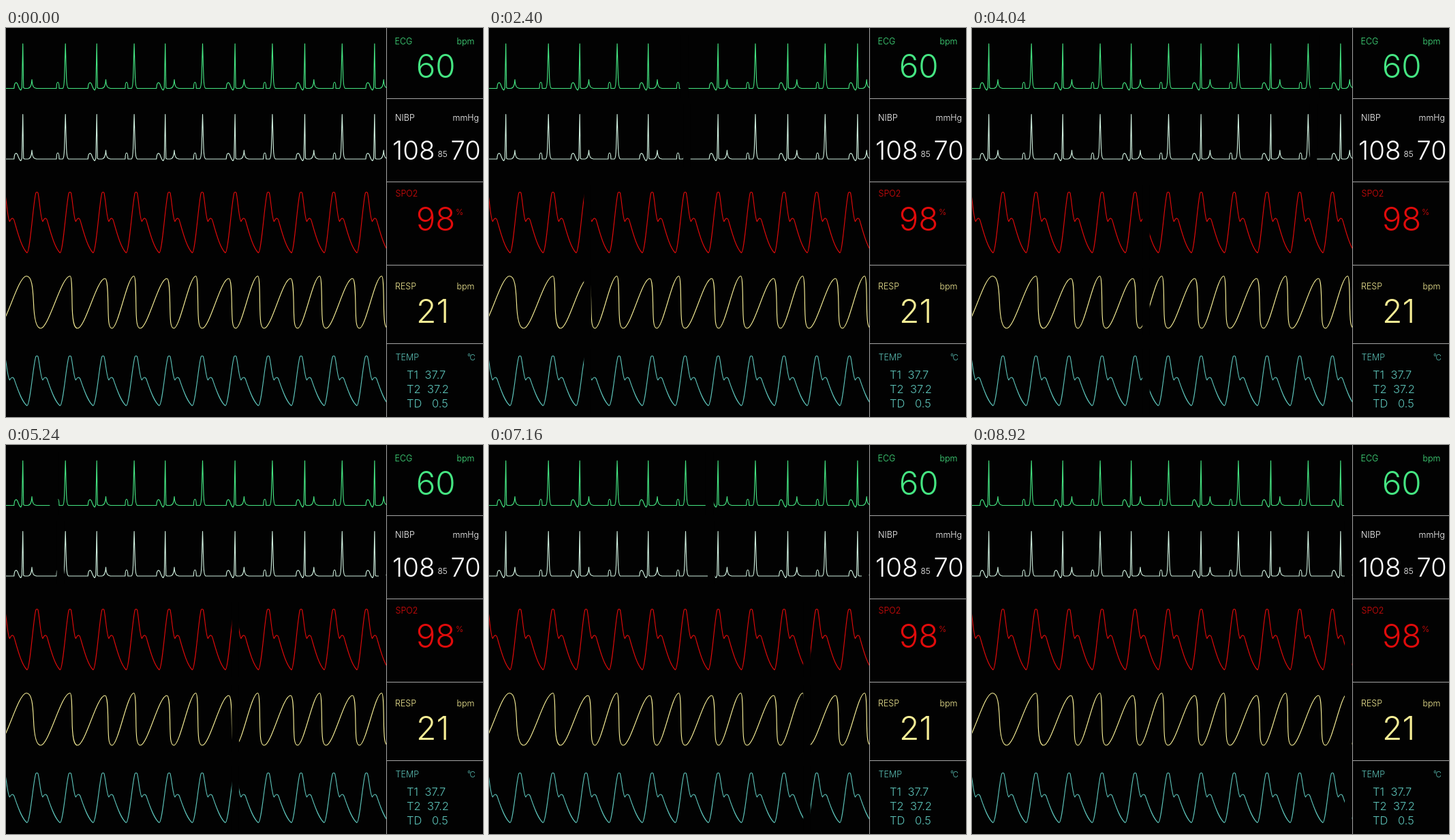
Recreate the animation shown at these times as an HTML page with a canvas. Size 700 by 570 pixels, loop 8960 ms.

```html
<!DOCTYPE html>
<html lang="en">
<head>
<meta charset="utf-8">
<title>Patient monitor</title>
<style>
html, body { margin: 0; width: 100%; height: 100%; overflow: hidden; background: #020202; }
canvas { display: block; }
</style>
</head>
<body>
<canvas id="stage" width="700" height="570"></canvas>
<script>
const ctx = document.getElementById('stage').getContext('2d');
const LOOP = 8960, HALF = LOOP / 2, STEP = 40;
const BACK = '#020202', RULE = '#a4a4a4', EDGE = 558;
const GREEN = '#45e582', WHITE = '#ffffff', PALE = '#cdeedd';
const RED = '#e00b0b', YELLOW = '#f6ee96', TEAL = '#5cc2b8';

// Two alternating kinds of beat on a flat baseline.
function heartTrace(base) {
  const path = new Path2D();
  const peak = base - 65.5;
  const narrow = x => {
    path.lineTo(x - 13, base);
    path.bezierCurveTo(x - 12.5, base - 9.5, x - 9, base - 11, x - 7, base - 4);
    path.bezierCurveTo(x - 5.5, base, x - 4.5, base + 2.5, x - 3, base + 2.5);
    path.lineTo(x - 1.5, base - 1);
    path.lineTo(x - 0.1, peak);
    path.lineTo(x + 0.9, base - 1);
    path.lineTo(x + 2.5, base);
    path.lineTo(x + 7, base);
    path.quadraticCurveTo(x + 12.5, base, x + 13.2, base - 13);
    path.quadraticCurveTo(x + 13.6, base - 3, x + 17, base - 1);
    path.lineTo(x + 20, base);
  };
  const wide = x => {
    path.lineTo(x - 13.2, base);
    path.bezierCurveTo(x - 13, base - 12, x - 9.3, base - 12, x - 9.2, base);
    path.lineTo(x - 4, base);
    path.quadraticCurveTo(x - 2, base - 1, x - 1.5, base - 16);
    path.lineTo(x, peak);
    path.lineTo(x + 1.5, base - 16);
    path.quadraticCurveTo(x + 2, base - 1, x + 4.5, base);
  };
  const pair = (x, apart) => {
    narrow(x);
    wide(x + apart);
  };
  path.moveTo(-2, base);
  pair(24.8, 62.4);
  pair(133.3, 54.8);
  for (let i = 0; i < 4; i++) pair(233.8 + 102.4 * i, 54.7);
  return path;
}

function pulseTrace(top, height) {
  const path = new Path2D();
  const k = height / 89;
  for (let i = -1; i < 12; i++) {
    const x = Math.min(45.4 + 48.5 * i, 49 + 48 * i);
    const curve = (a, b, c, d, e, f) =>
      path.bezierCurveTo(x + a, top + b * k, x + c, top + d * k, x + e, top + f * k);
    if (i < 0) path.moveTo(x - 14.5, top + height);
    curve(-10, 89, -5, 10, -1.5, 1);
    curve(-0.8, -0.3, 0.8, -0.3, 1.5, 1);
    curve(3.5, 8, 5.5, 40, 8.5, 43);
    curve(10, 40, 11.5, 38, 13, 38.5);
    curve(15, 39, 15.5, 43, 16.5, 46.5);
    curve(22, 66, 27, 82, 33.9, 89);
  }
  return path;
}

function breathTrace() {
  const path = new Path2D();
  const high = 363.5, low = 440;
  let from = -12.8;
  path.moveTo(from, low);
  const breath = (x, top, fall, trough) => {
    const span = x - from, lean = fall * 0.1;
    path.bezierCurveTo(from + span * 0.28, low, x - span * 0.3, top, x, top);
    path.bezierCurveTo(x + fall * 0.75, top, x + fall - lean, top + 16, x + fall, 402);
    path.bezierCurveTo(x + fall + lean, 430, x + trough - 5, low, x + trough, low);
    from = x + trough;
  };
  breath(30, high, 10.4, 20.8);
  breath(94, high, 3, 11);
  for (let i = 0; i < 5; i++) {
    breath(145.3 + 90.8 * i, 367, 4.4, 10.3);
    breath(187.7 + 90.9 * i, high, 3, 9.3);
  }
  return path;
}

const heartGap = t => Math.min(-36 + 0.132 * (t % HALF), 546);
const pressureGap = t => Math.min(-23.1 + 0.1284 * (t % HALF), 547);
const slowGap = t => Math.min(-23.1 + 0.06764 * t, 547);

const traces = [
  { path: heartTrace(88.5), color: GREEN, y: 10, h: 92, gap: heartGap, width: 12 },
  { path: heartTrace(192), color: PALE, y: 112, h: 92, gap: pressureGap, width: 10.6, keepsEnd: true },
  { path: pulseTrace(240.5, 89), color: RED, y: 230, h: 110, gap: slowGap, width: 10.6 },
  { path: breathTrace(), color: YELLOW, y: 352, h: 98, gap: slowGap, width: 10.6 },
  { path: pulseTrace(480.5, 73), color: TEAL, y: 470, h: 95, gap: slowGap, width: 10.6 }
];

// text, ink left, baseline, size, color
const labels = [
  ['ECG', 571.5, 23.5, 12.5, GREEN], ['bpm', 662.5, 23.5, 12.5, GREEN], ['60', 604.7, 73, 47.5, GREEN],
  ['NIBP', 572, 135.5, 12.5, WHITE], ['mmHg', 656.5, 135.5, 12.5, WHITE],
  ['108', 569, 193, 38.5, WHITE], ['85', 633.5, 189, 12, WHITE], ['70', 654.5, 193, 38, WHITE],
  ['SPO2', 571.5, 247, 12.5, RED], ['98', 604.7, 297, 47.5, RED], ['%', 661, 273.5, 12, RED],
  ['RESP', 572, 382.5, 12.5, YELLOW], ['bpm', 662.5, 382.5, 12.5, YELLOW], ['21', 605, 432, 48, YELLOW],
  ['TEMP', 571.5, 486.5, 12.5, TEAL], ['°', 677, 485.5, 11, TEAL], ['C', 680.5, 487, 11.5, TEAL],
  ['T1', 588, 513.5, 16.5, TEAL], ['37.7', 615.5, 513.5, 16.5, TEAL],
  ['T2', 588, 534.5, 16.5, TEAL], ['37.2', 619, 534.5, 16.5, TEAL],
  ['TD', 588, 555.5, 16.5, TEAL], ['0.5', 626, 555.5, 16.5, TEAL]
];

function drawTrace(trace, t) {
  ctx.strokeStyle = trace.color;
  ctx.stroke(trace.path);
  ctx.fillStyle = BACK;
  const cover = x => ctx.fillRect(x, trace.y, trace.width, trace.h);
  cover(trace.gap(t));
  if (trace.keepsEnd && t >= HALF) cover(547);
}

function drawLabel([text, x, y, size, color]) {
  ctx.font = `300 ${size}px Inter, sans-serif`;
  ctx.fillStyle = color;
  ctx.fillText(text, x + ctx.measureText(text).actualBoundingBoxLeft, y);
}

function draw(t) {
  ctx.fillStyle = BACK;
  ctx.fillRect(0, 0, 700, 570);
  ctx.save();
  ctx.beginPath();
  ctx.rect(0, 0, EDGE, 570);
  ctx.clip();
  ctx.lineWidth = 1.15;
  ctx.lineJoin = 'round';
  traces.forEach(trace => drawTrace(trace, t));
  ctx.restore();
  ctx.fillStyle = RULE;
  ctx.fillRect(EDGE, 0, 1, 570);
  for (const y of [103, 225, 347, 462]) ctx.fillRect(EDGE, y, 142, 1);
  labels.forEach(drawLabel);
}

const start = performance.now();
function tick() {
  const t = (performance.now() - start) % LOOP;
  draw(Math.floor(t / STEP) * STEP);
  requestAnimationFrame(tick);
}
tick();
</script>
</body>
</html>
```
